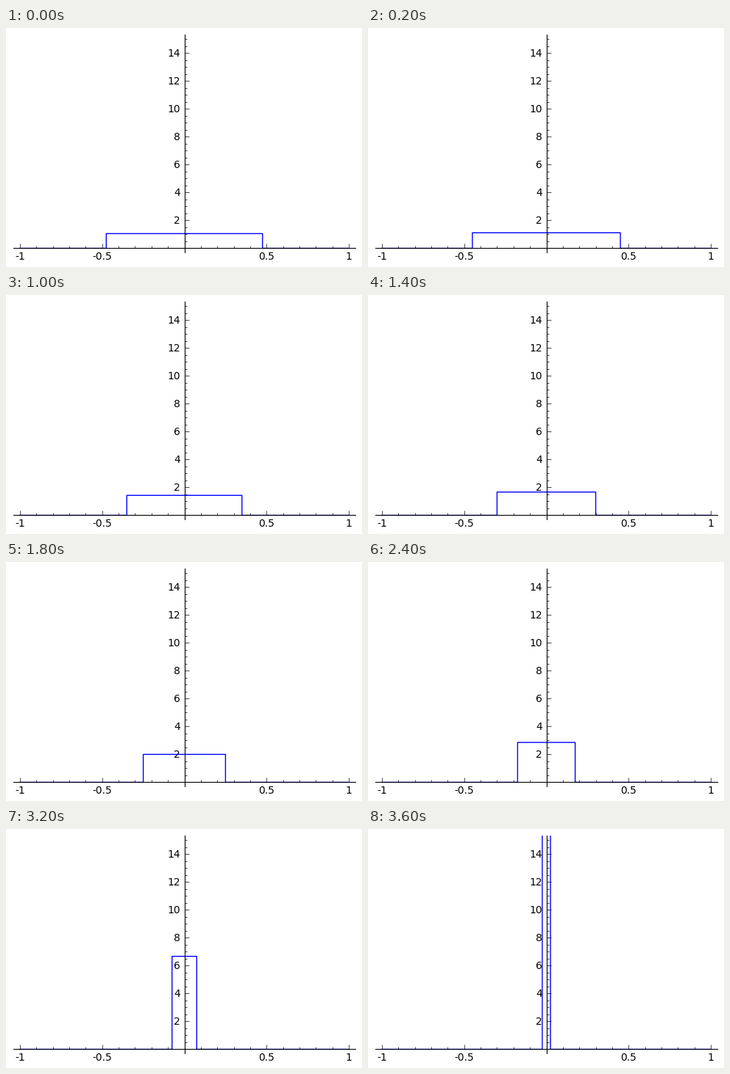
Write a matplotlib script that moves like this. It is 484 px wide and 326 px high and loops after 3.8 s.

```python
import numpy as np
import matplotlib.pyplot as plt
from matplotlib.animation import FuncAnimation
from matplotlib.transforms import Affine2D

W, H, DPI = 484, 326, 100
FRAMES, STEP_MS = 19, 200

# Pixel position of the origin (from the top left) and pixels per unit
OX, OY = 242.51, 300.45
SX, SY = 223.6, 19.02
X_END, Y_LOW, Y_HIGH = 1.04, -0.3, 15.3

plt.rcParams["font.family"] = "DejaVu Sans"

fig = plt.figure(figsize=(W / DPI, H / DPI), dpi=DPI, facecolor="white")
ax = fig.add_axes([
    (OX - X_END * SX) / W,
    (H - OY + Y_LOW * SY) / H,
    2 * X_END * SX / W,
    (Y_HIGH - Y_LOW) * SY / H,
])
ax.set_xlim(-X_END, X_END)
ax.set_ylim(Y_LOW, Y_HIGH)
ax.patch.set_visible(False)


def style_axes():
    for side in ("top", "right"):
        ax.spines[side].set_visible(False)
    for side in ("bottom", "left"):
        ax.spines[side].set_position("zero")
        ax.spines[side].set_linewidth(0.8)

    ax.set_xticks([-1, -0.5, 0.5, 1], ["-1", "-0.5", "0.5", "1"])
    ax.set_xticks([i / 10 for i in range(-9, 10) if i % 5], minor=True)
    evens = range(2, 15, 2)
    ax.set_yticks(evens, [str(v) for v in evens])
    ax.set_yticks([i / 2 for i in range(1, 31) if i % 4], minor=True)

    ax.tick_params(which="both", direction="in", width=0.5)
    ax.tick_params(which="major", length=4, pad=4, labelsize=10)
    ax.tick_params(which="minor", length=2)

    # Labels sit one pixel above their default place
    lift = Affine2D().translate(0, 1)
    for label in ax.get_xticklabels() + ax.get_yticklabels():
        label.set_transform(label.get_transform() + lift)


style_axes()
pulse, = ax.plot([], [], color="blue", lw=1, snap=False,
                 solid_joinstyle="round")


def draw(i):
    """Unit-area pulse that narrows by the same amount each step."""
    half = 0.475 - 0.025 * i
    top = 1 / (2 * half)
    xs = np.array([-1, -half, -half, half, half, 1])
    ys = np.array([0, 0, top, top, 0, 0])
    pulse.set_data(xs, ys)
    return pulse,


anim = FuncAnimation(fig, draw, frames=FRAMES, init_func=lambda: draw(0),
                     interval=STEP_MS, repeat=True, repeat_delay=0)
plt.show()
```
